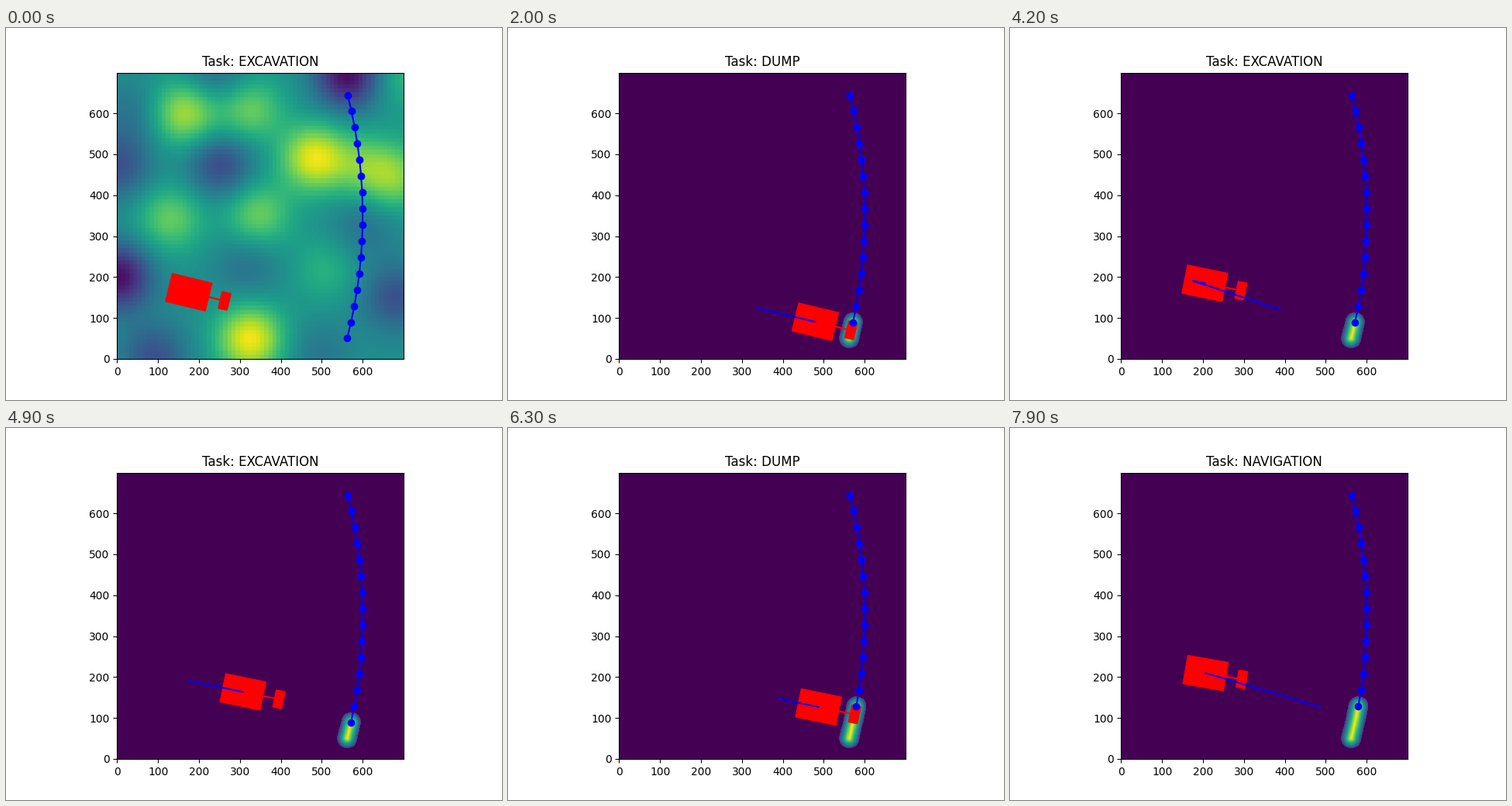
Animation of 640 by 480 pixels, one loop 8000 ms. Source, as a matplotlib script:

```python
import numpy as np
import matplotlib.pyplot as plt
from matplotlib.animation import FuncAnimation
from matplotlib.patches import Polygon

SIZE = 700
PHASE = 10            # frames per task phase
FRAMES = 80
TRAIL = 10            # positions kept in the trail
PIVOT = np.array([-600.0, 350.0])
RADIUS = 1200
REACH = 90            # body centre to bucket centre
DIG = 150             # distance driven while digging
TASKS = ["EXCAVATION", "NAVIGATION", "DUMP", "NAVIGATION"]

# Ground height and the spots that reach it
SPOTS = {
    .98: [(480, 490), (325, 48)],
    .85: [(165, 600), (600, 470), (680, 442)],
    .76: [(325, 605), (130, 342), (345, 350)],
    .63: [(510, 218), (440, 390), (370, 540), (695, 690)],
    .40: [(320, 230), (600, 325), (490, 10), (40, 600), (240, 695)],
    .25: [(3, 470), (680, 150), (90, 5), (253, 475)],
    .04: [(565, 692), (3, 200)],
}


def heading(a):
    return np.array([np.cos(a), np.sin(a)])


def grid(n):
    c = (np.arange(n) + .5) * SIZE / n - .5
    return np.meshgrid(c, c)


def terrain(mean=.5, spread=58):
    """Smooth surface through all the spots, flat away from them."""
    spots = np.array([s for group in SPOTS.values() for s in group])
    rise = np.array([h - mean for h, group in SPOTS.items() for _ in group])
    x, y = grid(70)

    def kernel(x, y):
        d2 = (x[..., None] - spots[:, 0]) ** 2 + (y[..., None] - spots[:, 1]) ** 2
        return np.exp(-d2 / (2 * spread ** 2))

    weights = np.linalg.solve(kernel(*spots.T), rise)
    return (mean + kernel(x, y) @ weights).clip(0, 1)


def ridge(points, width=24.5):
    """Pile of soil along a polyline, highest on its crest."""
    x, y = grid(SIZE)
    dist = np.full_like(x, np.inf)
    for a, b in zip(points, points[1:]):
        d = b - a
        t = ((x - a[0]) * d[0] + (y - a[1]) * d[1]) / (d @ d)
        t = t.clip(0, 1)
        dist = np.minimum(dist, np.hypot(x - a[0] - t * d[0], y - a[1] - t * d[1]))
    return np.where(dist < width, 1 - .85 * dist / width, 0)


angles = -.2525 + np.arange(16) / 30
berm = np.array([PIVOT + RADIUS * heading(a) for a in angles])
mid_angles = (angles[1:] + angles[:-1]) / 2
mid_points = (berm[1:] + berm[:-1]) / 2

# One pose (x, y, angle) at every phase boundary
keys = []
for k in range(3):
    a = mid_angles[k]
    start = np.array([175, 162.8 + 28.1 * k])
    stop = mid_points[k] - REACH * heading(a)
    for p in (start, start + DIG * heading(a), stop, stop):
        keys.append((*p, a))
keys = np.array(keys)


def pose(i):
    k, step = divmod(i, PHASE)
    return keys[k] + (keys[k + 1] - keys[k]) * step / PHASE


def box(p, ahead, w, h):
    """Corners of a w by h box lying ahead of the pose."""
    u = heading(p[2])
    v = np.array([-u[1], u[0]])
    c = p[:2] + ahead * u
    return [c + sx * w / 2 * u + sy * h / 2 * v
            for sx, sy in ((-1, -1), (1, -1), (1, 1), (-1, 1))]


def body_box(p):
    return box(p, 0, 100, 70)


def bucket_box(p):
    return box(p, REACH, 22, 42)


maps = [terrain(), ridge(berm[:2]), ridge(berm[:3])]

fig, ax = plt.subplots(figsize=(6.4, 4.8), dpi=100)
edges = (-.5, SIZE - .5)
image = ax.imshow(maps[0], origin="lower", extent=edges * 2,
                  vmin=0, vmax=1, interpolation="nearest")
body = ax.add_patch(Polygon(body_box(keys[0]), color="red"))
bucket = ax.add_patch(Polygon(bucket_box(keys[0]), color="red"))
arm, = ax.plot([], [], "r-")
trail, = ax.plot([], [], "b-")
path, = ax.plot([], [], "bo-")
title = ax.set_title("")
ax.set(xlim=edges, ylim=edges)


def draw(i):
    p = pose(i)
    dumps = (i + 2 * PHASE) // (4 * PHASE)
    title.set_text("Task: " + TASKS[i // PHASE % 4])
    image.set_data(maps[dumps])
    path.set_data(*berm[dumps:].T)
    body.set_xy(body_box(p))
    bucket.set_xy(bucket_box(p))
    arm.set_data(*np.array([p[:2], p[:2] + REACH * heading(p[2])]).T)
    past = np.array([pose(j)[:2] for j in range(max(0, i - TRAIL + 1), i + 1)])
    trail.set_data(*past.T)
    return image, body, bucket, arm, trail, path, title


anim = FuncAnimation(fig, draw, frames=FRAMES, interval=100,
                     init_func=lambda: draw(0), repeat=True, repeat_delay=0)
plt.show()
```
